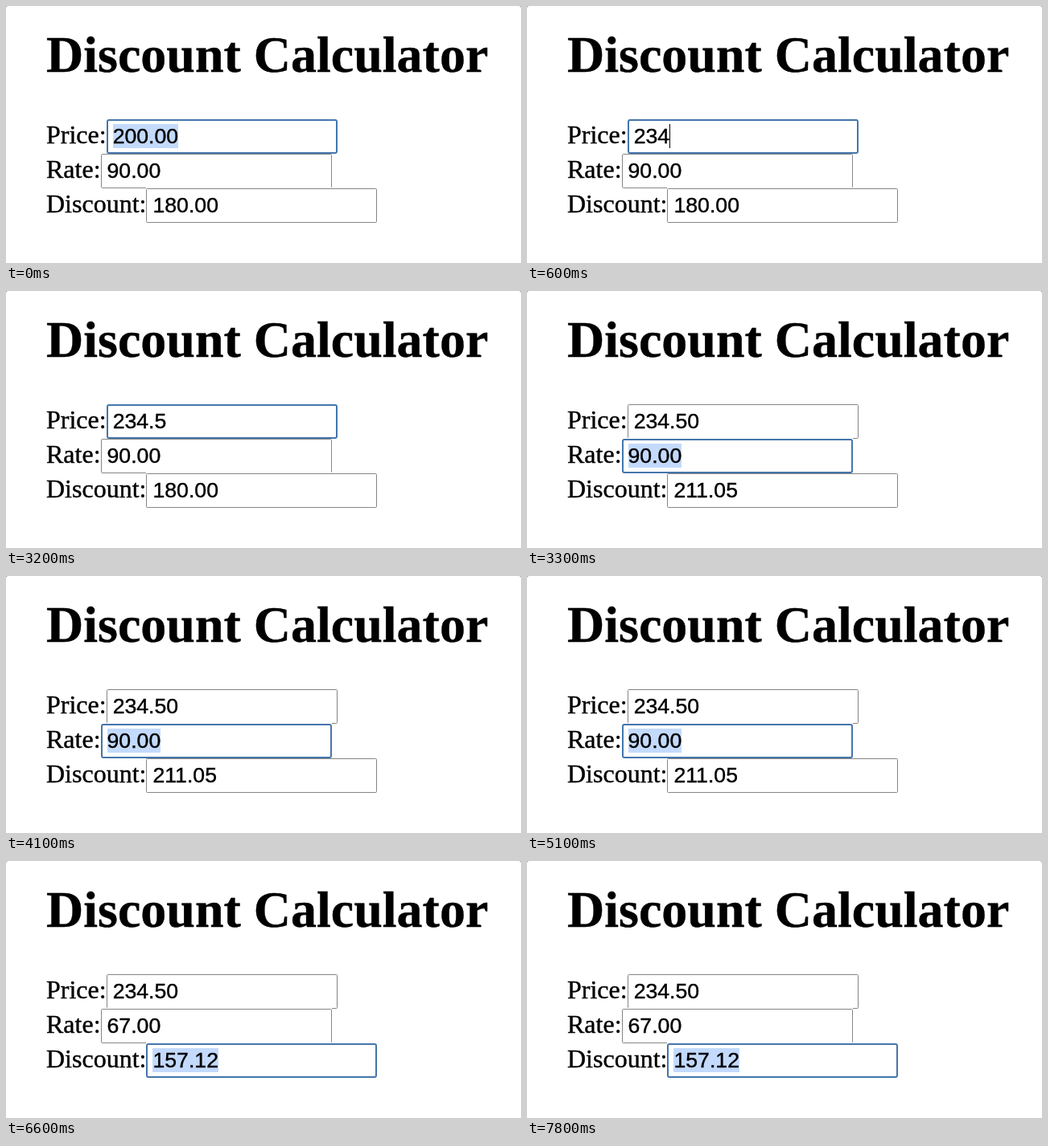
An HTML page that plays this animation: 640x320 px, repeating every 8000 ms.

```html
<!DOCTYPE html>
<html lang="en">
<head>
<meta charset="utf-8">
<title>Discount Calculator</title>
<style>
  html, body { margin: 0; width: 100%; height: 100%; overflow: hidden; background: #fff; }
  svg { display: block; }
  text { white-space: pre; stroke: #000; stroke-width: .4; }
  .label { font: 32px "Liberation Serif", serif; }
  .title { font: bold 64px "Liberation Serif", serif; }
  .value { font: 26.667px "Liberation Sans", sans-serif; }
  .back { fill: #fff; }
  .box { fill: none; stroke: #858585; }
  .ring { fill: none; stroke: #4475ac; stroke-width: 2; }
  .selection { fill: #c3dafc; }
</style>
</head>
<body>
<svg id="stage" width="640" height="320" viewBox="0 0 640 320">
  <path d="M0 0h2l-2 2zM640 0h-2l2 2z" fill="#aaa"/>
  <text class="title" x="50" y="82">Discount Calculator</text>
</svg>
<script>
const LOOP = 8000, LEFT = 50, WIDTH = 287, HEIGHT = 43, PAD = 8;
const stage = document.getElementById('stage');

function add(tag, attrs, content = '') {
  const el = document.createElementNS('http://www.w3.org/2000/svg', tag);
  set(el, attrs);
  el.textContent = content;
  return stage.appendChild(el);
}

function set(el, attrs) {
  for (const key in attrs) el.setAttribute(key, attrs[key]);
}

// Each field's backing hides the bottom edge of the one above it.
const fields = [['Price:', 125], ['Rate:', 118], ['Discount:', 174]].map(([name, x], i) => {
  const y = 141 + i * HEIGHT;
  const label = add('text', { class: 'label', x: LEFT, y: y + 30 }, name);
  add('rect', { class: 'back', x, y: y - 1, width: WIDTH, height: HEIGHT + 1 });
  const box = add('rect', { class: 'box', x: x + .5, y: y + .5, width: WIDTH - 1, height: HEIGHT - 1, rx: 1 });
  return { x, y, box, textX: LEFT + label.getComputedTextLength() + PAD };
});

const selection = add('rect', { class: 'selection', height: 30 });
for (const field of fields) {
  field.text = add('text', { class: 'value', x: field.textX, y: field.y + 30 });
}
const ring = add('rect', { class: 'ring', width: WIDTH - 2, height: HEIGHT - 2, rx: 2 });
const caret = add('rect', { width: 1, height: 30 });

// Each key press: time, focused field, its text, and whether the text is selected.
const keys = [
  [0, 0, '200.00', true],
  [100, 0, '2'],
  [200, 0, '23'],
  [300, 0, '234'],
  [800, 0, '2345'],
  [1700, 0, '2345'],
  [1900, 0, '234'],
  [2100, 0, '234.'],
  [2700, 0, '234.5'],
  [3300, 1, '90.00', true],
  [5200, 1, '6'],
  [5800, 1, '67'],
  [6500, 2, '157.12', true]
];

// Values of the fields while each one has the focus.
const settled = [
  ['200.00', '90.00', '180.00'],
  ['234.50', '90.00', '211.05'],
  ['234.50', '67.00', '157.12']
];

function draw(now) {
  const t = now % LOOP;
  const [start, focus, typed, selected] = keys.findLast(key => key[0] <= t);
  fields.forEach(({ box, text }, i) => {
    text.textContent = i === focus ? typed : settled[focus][i];
    box.style.display = i === focus ? 'none' : '';
  });

  const { x, y, text, textX } = fields[focus];
  const length = text.getComputedTextLength();
  const left = x + PAD;
  const blinkOn = (t - start) % 1000 < 500;
  set(ring, { x: x + 1, y: y + 1 });
  set(selection, { x: left, y: y + 6, width: selected ? Math.round(textX + length) - left : 0 });
  set(caret, {
    x: Math.round(left + length), y: y + 6,
    visibility: !selected && blinkOn ? 'visible' : 'hidden'
  });
}

const origin = performance.now();
function tick() {
  draw(performance.now() - origin);
  requestAnimationFrame(tick);
}
tick();
</script>
</body>
</html>
```
